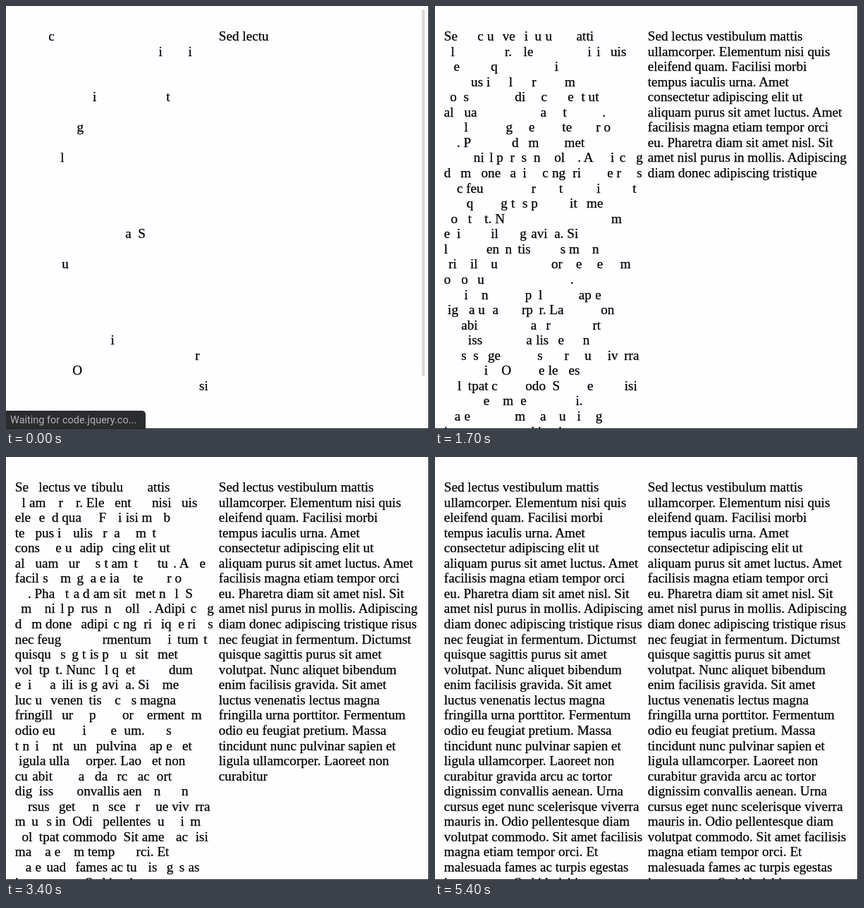
These frames come from a looping animation (600x600 px, 5.7 s). An HTML page with a canvas:

```html
<!DOCTYPE html>
<html lang="la">
<head>
<meta charset="utf-8">
<title>Two ways to reveal text</title>
<style>
html, body { margin: 0; width: 100%; height: 100%; overflow: hidden; background: #fefdff; }
canvas { display: block; }
</style>
</head>
<body>
<canvas id="stage" width="600" height="600"></canvas>
<script>
const LOOP = 5700, STEP = 100;
const LEFT = 12.8, RIGHT = 301.8, BASELINE = 49, PITCH = 21.56;
const FONT = '19.17px "Liberation Serif", Times, serif';
const ctx = document.getElementById('stage').getContext('2d');

const lines = `Sed lectus vestibulum mattis
ullamcorper. Elementum nisi quis
eleifend quam. Facilisi morbi
tempus iaculis urna. Amet
consectetur adipiscing elit ut
aliquam purus sit amet luctus. Amet
facilisis magna etiam tempor orci
eu. Pharetra diam sit amet nisl. Sit
amet nisl purus in mollis. Adipiscing
diam donec adipiscing tristique risus
nec feugiat in fermentum. Dictumst
quisque sagittis purus sit amet
volutpat. Nunc aliquet bibendum
enim facilisis gravida. Sit amet
luctus venenatis lectus magna
fringilla urna porttitor. Fermentum
odio eu feugiat pretium. Massa
tincidunt nunc pulvinar sapien et
ligula ullamcorper. Laoreet non
curabitur gravida arcu ac tortor
dignissim convallis aenean. Urna
cursus eget nunc scelerisque viverra
mauris in. Odio pellentesque diam
volutpat commodo. Sit amet facilisis
magna etiam tempor orci. Et
malesuada fames ac turpis egestas
integer eget. Sed id nisi in`.split('\n');

// Letters already present at the start: row -> columns
const opening = {
  0: [6], 1: [24, 30], 4: [14, 29], 6: [12], 8: [8], 13: [21, 24],
  15: [10], 20: [17], 21: [33], 22: [11], 23: [33, 34]
};

// Typed characters against time
const typing = [[0, 9], [1000, 198], [1700, 325], [2700, 508], [3400, 636], [4200, 783], [4800, 894]];

function seeded(seed) {
  return () => {
    seed = (seed + 0x6D2B79F5) | 0;
    let v = Math.imul(seed ^ (seed >>> 15), 1 | seed);
    v = (v + Math.imul(v ^ (v >>> 7), 61 | v)) ^ v;
    return ((v ^ (v >>> 14)) >>> 0) / 4294967296;
  };
}

// Kerning across spaces tightens pairs such as ". A"
function useBodyFont() {
  ctx.font = FONT;
  ctx.textRendering = 'optimizeLegibility';
  ctx.fillStyle = ctx.strokeStyle = '#000';
  ctx.lineWidth = 0.25;
}

function drawText(text, x, y) {
  ctx.fillText(text, x, y);
  ctx.strokeText(text, x, y);
}

const random = seeded(7);
const width = text => ctx.measureText(text).width;
const letters = [];
useBodyFont();
lines.forEach((line, row) => {
  [...line].forEach((char, col) => {
    const start = opening[row]?.includes(col) ? 0 : 100 + random() * 4890;
    if (char !== ' ') letters.push({
      char, start,
      x: LEFT + width(line.slice(0, col + 1)) - width(char),
      y: BASELINE + row * PITCH
    });
  });
});

function typedCount(t) {
  const i = typing.findIndex(([time]) => time > t);
  if (i < 0) return Infinity;
  const [t0, n0] = typing[i - 1], [t1, n1] = typing[i];
  return Math.round(n0 + (n1 - n0) * (t - t0) / (t1 - t0));
}

function fadeOut(t, from, to) {
  return Math.max(0, Math.min(1, (to - t) / (to - from)));
}

function roundBox(x, y, w, h, radius, color) {
  ctx.fillStyle = color;
  ctx.beginPath();
  ctx.roundRect(x, y, w, h, radius);
  ctx.fill();
}

function drawBrowser(t) {
  ctx.globalAlpha = fadeOut(t, 0, 700);
  roundBox(590, 5, 4, 520, 2, '#d9d8da');
  ctx.globalAlpha = fadeOut(t, 100, 400);
  roundBox(0, 574, 198, 25, [0, 5, 0, 0], '#2b2c30');
  ctx.fillStyle = '#b2b2b6';
  ctx.font = '14.5px Roboto, Inter, sans-serif';
  ctx.fillText('Waiting for code.jquery.co...', 6, 592);
  ctx.globalAlpha = 1;
  ctx.fillStyle = '#222';
  ctx.fillRect(0, 599, 600, 1);
  ctx.fillRect(599, 0, 1, 600);
}

function draw(t) {
  ctx.fillStyle = '#fefdff';
  ctx.fillRect(0, 0, 600, 600);
  useBodyFont();
  for (const { char, start, x, y } of letters) {
    if (start <= t) drawText(char, x, y);
  }
  let left = typedCount(t);
  lines.forEach((line, row) => {
    if (left > 0) drawText(line.slice(0, left), RIGHT, BASELINE + row * PITCH);
    left -= line.length + 1;
  });
  drawBrowser(t);
}

const begin = performance.now();
function frame() {
  const t = (performance.now() - begin) % LOOP;
  draw(Math.floor(t / STEP) * STEP);
  requestAnimationFrame(frame);
}
frame();
</script>
</body>
</html>
```
